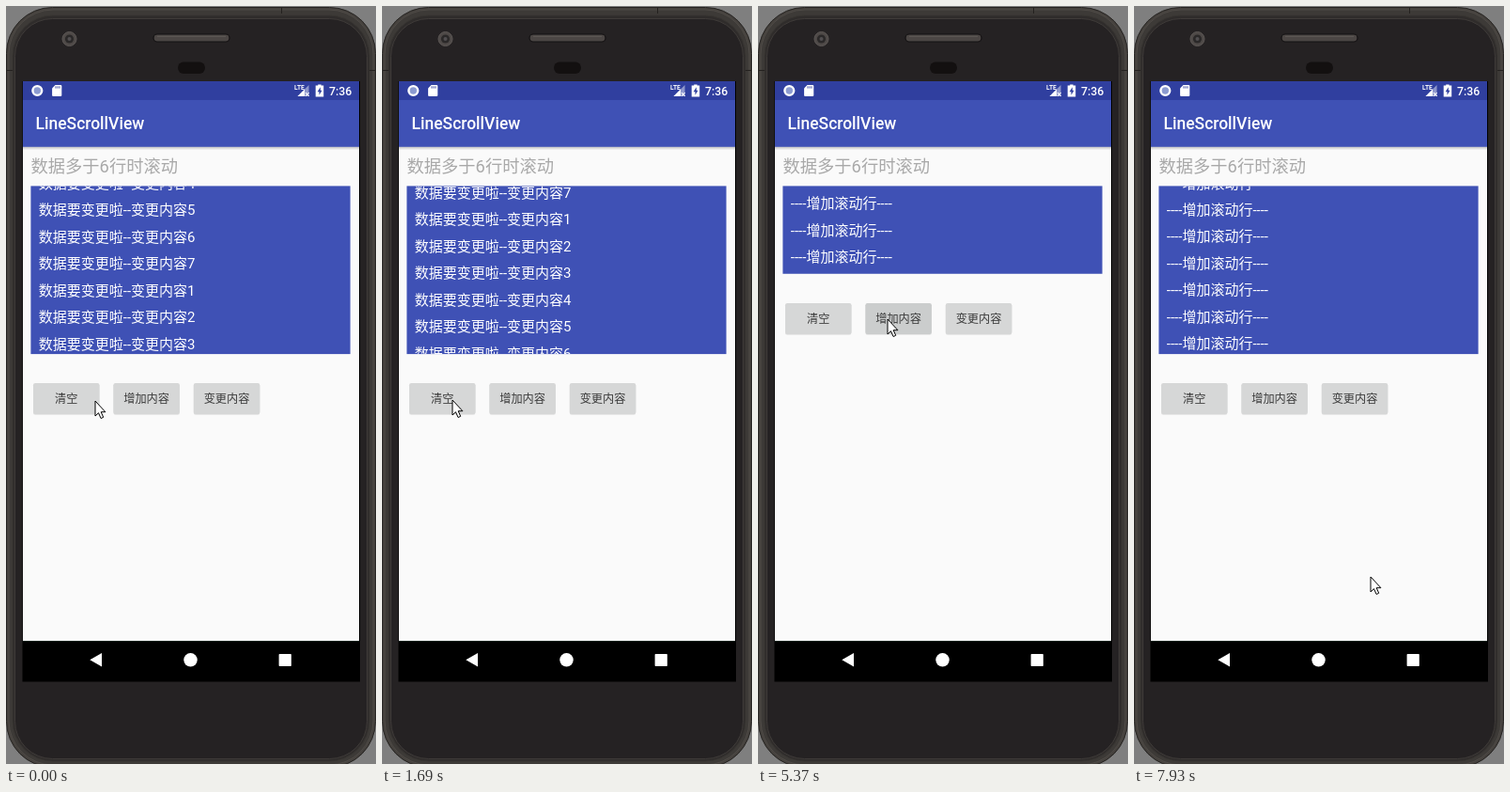
These frames come from a looping animation (394 px wide and 806 px high, 7990 ms). An HTML page:

```html
<!DOCTYPE html>
<html lang="zh-CN">
<head>
<meta charset="utf-8">
<title>LineScrollView</title>
<style>
html, body { margin: 0; width: 100%; height: 100%; overflow: hidden; background: #7f7f7f; }
svg { display: block; width: 394px; height: 806px; }
text { font-family: Roboto, "Noto Sans CJK SC", "Noto Sans CJK", sans-serif; white-space: pre; }
#rows text { font-size: 15px; fill: #fff; }
#buttons text { font-size: 12.2px; fill: #3c3c3c; text-anchor: middle; }
</style>
</head>
<body>
<svg viewBox="0 0 394 806">
  <defs>
    <clipPath id="clip"><rect id="clipBox" x="26" y="191.4" width="341" height="179"/></clipPath>
    <linearGradient id="shade" x2="0" y2="1">
      <stop stop-color="#000" stop-opacity=".22"/><stop offset="1" stop-color="#000" stop-opacity="0"/>
    </linearGradient>
  </defs>

  <!-- phone body -->
  <rect x=".5" y="1.5" width="393" height="808" rx="49" fill="#45413d" stroke="#262422"/>
  <rect x="3" y="4" width="388" height="803" rx="47" fill="#3d3a37" stroke="#4f4b47"/>
  <rect x="7" y="10" width="380" height="793" rx="43" fill="#2f2c2b" stroke="#383532"/>
  <rect x="9.5" y="13.5" width="375" height="787" rx="40" fill="#252223" stroke="#3f3b39"/>
  <path d="M293.5 2V8M1 68.5H7M387 68.5H393" stroke="#24211f"/>
  <circle cx="67.5" cy="35" r="7.5" fill="#4f4a48" stroke="#5c5755"/>
  <circle cx="67.5" cy="35" r="4.6" fill="#2b2929"/>
  <circle cx="67.5" cy="35" r="2" fill="#514e50"/>
  <rect x="157" y="30" width="81" height="8" rx="4" fill="#4b4644" stroke="#131112" stroke-width="1.2"/>
  <path d="M161 32.3H234" stroke="#5f5a57"/>
  <rect x="183" y="59.5" width="29" height="12.5" rx="6.2" fill="#131010"/>

  <!-- screen -->
  <rect x="17.5" y="80" width="359.5" height="638.5" fill="#000"/>
  <rect x="18" y="100" width="358" height="575" fill="#fafafa"/>
  <rect x="18" y="80" width="358" height="20" fill="#303f9f"/>
  <rect x="18" y="100" width="358" height="49.8" fill="#3f51b5"/>
  <rect x="18" y="149.8" width="358" height="3.5" fill="url(#shade)"/>
  <path d="M18 675.5H376" stroke="#16211c"/>

  <!-- status bar -->
  <circle cx="33.3" cy="90" r="4.9" fill="#8c9bd0" stroke="#fff" stroke-width="2.4"/>
  <path d="M52.5 84H58.2Q59.3 84 59.3 85.1V95Q59.3 96.1 58.2 96.1H50.2Q49.1 96.1 49.1 95V87.4Z" fill="#fff"/>
  <path d="M53 85.3V87.6M55 85.3V87.6M57 85.3V87.6" stroke="#303f9f" stroke-width=".9"/>
  <path d="M322.5 84V96H310.5Z" fill="#8f98cc"/>
  <path d="M318 88.5V96H310.5Z" fill="#fff"/>
  <path d="M319 92.2L322.6 95.8M322.6 92.2L319 95.8" stroke="#fff" stroke-width="1.1"/>
  <text x="307" y="88.6" font-size="6.6" font-weight="700" fill="#fff">LTE</text>
  <path d="M332.2 84.6V83.4H335.6V84.6H338.2V96.4H329.7V84.6Z" fill="#fff"/>
  <path d="M334.8 86.2L331.6 91.2H333.5V94.8L336.5 89.8H334.8Z" fill="#303f9f"/>
  <text x="344" y="94.6" font-size="12.3" font-weight="500" fill="#fff">7:36</text>

  <text x="31.5" y="131.4" font-size="17.5" font-weight="500" fill="#fff">LineScrollView</text>
  <text x="26.5" y="177.2" font-size="18.3" fill="#a9a9a9">数据多于6行时滚动</text>

  <rect id="list" x="26.4" y="191.4" width="340.2" height="178.7" fill="#3f51b5"/>
  <g id="rows" clip-path="url(#clip)"></g>
  <g id="buttons"></g>

  <!-- navigation bar -->
  <path d="M89.3 695.3L102 688V702.6Z" fill="#fff"/>
  <circle cx="196.5" cy="695.3" r="7.2" fill="#fff"/>
  <rect x="290.6" y="689" width="13.2" height="13" rx=".8" fill="#fff"/>

  <path id="cursor" d="M.5 .5V16.5L4 13.2L6.6 19L9.2 17.8L6.7 12.2H11.4Z" fill="#fff" stroke="#000" stroke-linejoin="round"/>
</svg>
<script>
const LOOP = 7990, PITCH = 28.45, TOP = 191.4, PAD = 8, MAX = 6;
const CLEAR = 2610, SCROLL = 6765;
const ADDS = [3710, 4350, 4950, 5600, 6150, 6680];
// screen refresh: [from, period]
const TICKS = [[0, 58.15], [6680, 58.5], [7510, 60]];
// pointer path: [time, x, y]
const PATH = [
  [0, 95, 420], [350, 75, 419], [2870, 75, 419], [3500, 139, 252],
  [3715, 139, 252], [3800, 137, 301], [3930, 137, 301], [4080, 136, 273],
  [4350, 136, 273], [4520, 137, 350], [4740, 137, 305],
  [4950, 137, 305], [5110, 138, 368], [5340, 138, 333],
  [5600, 138, 333], [5770, 139, 391], [5980, 140, 362],
  [6150, 140, 362], [6300, 142, 411], [6390, 142, 411], [6480, 151, 386],
  [6740, 151, 386], [7090, 157, 465], [7450, 190, 523], [7930, 252, 607]
];

const $ = id => document.getElementById(id);
function add(parent, tag, attrs, label) {
  const el = document.createElementNS("http://www.w3.org/2000/svg", tag);
  for (const k in attrs) el.setAttribute(k, attrs[k]);
  if (label) el.textContent = label;
  return parent.appendChild(el);
}

const rows = Array.from({ length: 8 }, () => add($("rows"), "text", { x: 34.8 }));
const faces = ["清空", "增加内容", "变更内容"].map((label, i) => {
  const x = 29 + i * 85.4;
  add($("buttons"), "rect", { x, y: .8, width: 70.5, height: 33, rx: 2.2, fill: "#000", opacity: .1 });
  const face = add($("buttons"), "rect", { x, y: 0, width: 70.5, height: 33, rx: 2.2, fill: "#d6d7d7" });
  add($("buttons"), "text", { x: x + 35.2, y: 20.9 }, label);
  return face;
});

function tick(t) {
  const [from, step] = TICKS.filter(k => k[0] <= t).pop();
  return from + Math.floor((t - from + 1) / step) * step;
}

function pointer(t) {
  const i = PATH.findIndex(p => p[0] > t);
  if (i < 0) return PATH[PATH.length - 1].slice(1);
  const a = PATH[i - 1], b = PATH[i], u = (t - a[0]) / (b[0] - a[0]);
  return [a[1] + (b[1] - a[1]) * u, a[2] + (b[2] - a[2]) * u];
}

function draw(t) {
  const q = tick(t), first = t < CLEAR;
  const count = first ? 7 : ADDS.filter(a => a <= t).length;
  const shown = Math.min(count, MAX);
  const height = shown ? PAD + shown * PITCH : 0;
  const offset = first ? 106.7 + q * .0447 : Math.max(0, (q - SCROLL) * .0431);
  const base = Math.floor(offset / PITCH);

  $("list").setAttribute("height", height);
  $("clipBox").setAttribute("height", height);
  rows.forEach((row, i) => {
    const k = base + i;
    row.textContent = count < MAX && k >= count ? ""
      : first ? "数据要变更啦--变更内容" + (k % 7 + 1) : "----增加滚动行----";
    row.setAttribute("y", (215.3 + k * PITCH - offset).toFixed(2));
  });

  $("buttons").setAttribute("transform", `translate(0 ${Math.round(TOP + height + 31)})`);
  faces[1].setAttribute("fill", t >= ADDS[1] && t < 7300 ? "#cbcdcd" : "#d6d7d7");
  const [x, y] = pointer(q).map(Math.round);
  $("cursor").setAttribute("transform", `translate(${x - .5} ${y - .5})`);
}

const start = performance.now();
function loop() {
  draw((performance.now() - start) % LOOP);
  requestAnimationFrame(loop);
}
loop();
</script>
</body>
</html>
```
